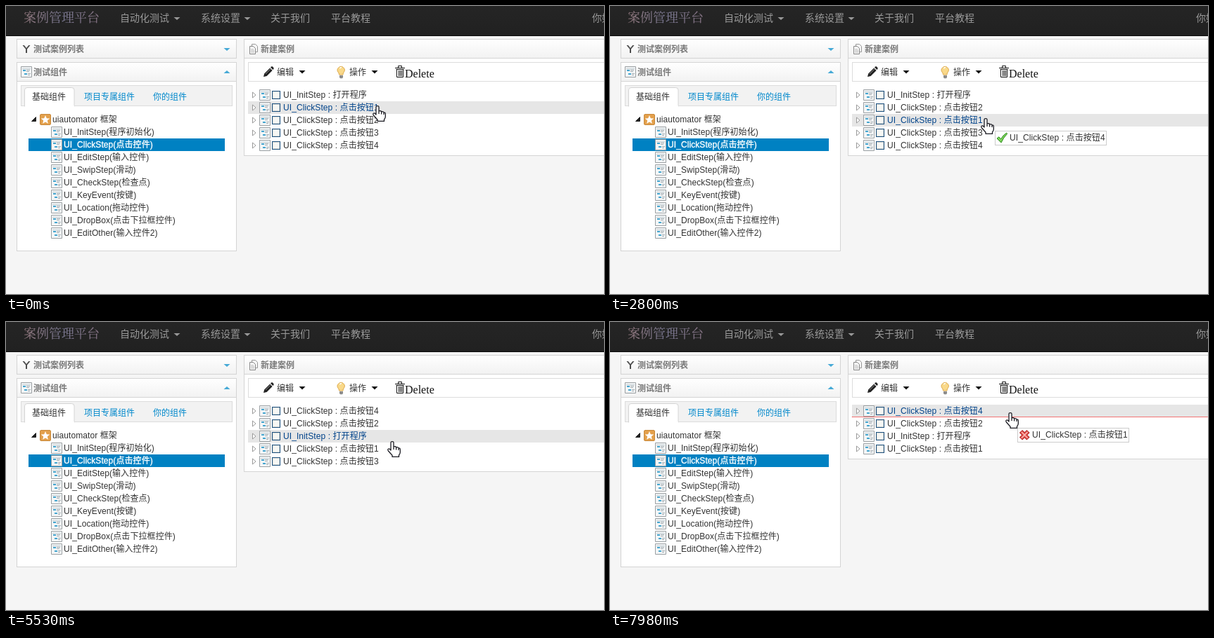
These frames come from a looping animation (850x411 px, 8 s). An HTML page:

```html
<!DOCTYPE html>
<html lang="zh-CN">
<head>
<meta charset="utf-8">
<title>案例管理平台</title>
<style>
html, body { margin: 0; width: 100%; height: 100%; overflow: hidden; background: #f5f5f5; }
svg { display: block; width: 850px; height: 411px; }
text { font: 12px "Liberation Sans", "Noto Sans CJK SC", "Noto Sans CJK", sans-serif; fill: #333; white-space: pre; }
.step { letter-spacing: .08px; }
.menu { font-size: 14px; fill: #999; }
.logo { font: 18px "Noto Serif CJK SC", "Noto Sans CJK SC", "Noto Sans CJK", serif; fill: url(#brand); }
.title { font-weight: bold; fill: #777; }
.link { fill: #0088cc; }
.del { font: 16px "Liberation Serif", serif; fill: #111; }
.on { fill: #fff; stroke: #fff; stroke-width: .35px; }
.hover { fill: #00438a; }
</style>
</head>
<body>
<svg id="stage" viewBox="0 0 850 411" xmlns="http://www.w3.org/2000/svg">
  <defs>
    <linearGradient id="head" x2="0" y2="1"><stop stop-color="#fff"/><stop offset="1" stop-color="#f2f2f2"/></linearGradient>
    <linearGradient id="bar" x2="0" y2="1"><stop stop-color="#252525"/><stop offset="1" stop-color="#212121"/></linearGradient>
    <linearGradient id="brand"><stop stop-color="#957a80"/><stop offset=".5" stop-color="#7f7d98"/><stop offset="1" stop-color="#8a7688"/></linearGradient>
    <g id="item">
      <path d="M.5 .5h15v15h-15z" fill="#f4f6f7" stroke="#9a9fa2"/>
      <path d="M2 3.5h12" stroke="#d3dade" stroke-width="2"/>
      <path d="M3 6h4M5 11h4" stroke="#45a5cf" stroke-width="2"/>
      <path d="M8 5.5h5M8 7.5h4M10 10.5h4M10 12.5h3" stroke="#a3abb0"/>
    </g>
    <g id="yes">
      <path d="M1 9L3.8 6.8l2.8 3Q9.5 4.6 14.6 1L15.6 2.4Q10.4 7.5 7 15z" fill="#7ed45c" stroke="#2b8a1c" stroke-linejoin="round"/>
    </g>
    <g id="no">
      <path d="M3 3l10.5 10.5M13.5 3L3 13.5" stroke="#a82020" stroke-width="6"/>
      <path d="M3.5 3.5l9.5 9.5M13 3.5L3.5 13" stroke="#e5504a" stroke-width="4"/>
      <path d="M4 4l8.5 8.5M12.5 4L4 12.5" stroke="#f9c0bc" stroke-width="1.4"/>
    </g>
  </defs>
  <g id="page"></g>
  <g id="list"></g>
  <g id="ghost"></g>
  <path id="hand" fill="#fff" stroke="#1b1b22" stroke-width="1.3" stroke-linejoin="round"
    d="M-2 2.4Q-2 .6 0 .6Q2 .6 2 2.4V8Q5 7 5.6 8.8Q8.3 8 9 9.8Q11.3 9.6 11.3 12V16Q11.3 18 9.5 20V22.4H0V20.3L-5.6 14Q-7 11.8-5.4 11Q-3.8 10.5-2 13ZM2 8v4M5.6 9v3.5M9 10v3"/>
</svg>
<script>
const $ = id => document.getElementById(id);
const text = (x, y, s, c = '') => `<text x="${x}" y="${y}" class="${c}">${s}</text>`;
const rect = (x, y, w, h, fill, more = '') => `<rect x="${x}" y="${y}" width="${w}" height="${h}" fill="${fill}" ${more}/>`;
const box = (x, y, w, h, fill, line = '#d4d4d4', more = '') =>
  rect(x + .5, y + .5, w - 1, h - 1, fill, `stroke="${line}" ${more}`);
const path = (d, fill, line = 'none', more = '') => `<path d="${d}" fill="${fill}" stroke="${line}" ${more}/>`;
const use = (id, x, y) => `<use href="#${id}" x="${x}" y="${y}"/>`;
const caret = (x, y, fill, dy = 4) => path(`M${x} ${y}h9l-4.5 ${dy}z`, fill);

function drawPage() {
  const tools = ['InitStep(程序初始化)', 'ClickStep(点击控件)', 'EditStep(输入控件)', 'SwipStep(滑动)',
    'CheckStep(检查点)', 'KeyEvent(按键)', 'Location(拖动控件)', 'DropBox(点击下拉框控件)', 'EditOther(输入控件2)'];
  let s = rect(0, 0, 850, 42, 'url(#bar)') + rect(0, 42, 850, 1, '#0a0a0a');
  s += text(25, 23, '案例管理平台', 'logo');
  [[162, '自动化测试'], [277, '系统设置'], [376, '关于我们'], [462, '平台教程'], [833, '你好']]
    .forEach(([x, m]) => s += text(x, 22, m, 'menu'));
  s += caret(238.5, 16, '#999') + caret(338.5, 16, '#999');

  // left panels
  s += box(15, 47, 313, 28, 'url(#head)') + box(15, 80, 313, 270, '#fff') + box(15, 80, 313, 28, 'url(#head)');
  s += path('M23.5 56l4.5 5.5v5.5h2v-5.5l4.5-5.5h-2.4l-3.1 4-3.1-4z', '#4d4d4d');
  s += text(39, 65.5, '测试案例列表', 'title') + caret(309.5, 60, '#45a9d6');
  s += use('item', 21, 86) + text(39, 98.5, '测试组件', 'title') + caret(309.5, 96, '#45a9d6', -4);
  s += box(21, 113, 301, 30, '#f2f2f2', '#dcdcdc');
  s += path('M26.5 143.5V120q0-3.5 3.5-3.5h63.5q3.5 0 3.5 3.5v23.5', '#fff', '#d4d4d4') + rect(27, 142, 70, 2, '#fff');
  s += text(37, 133.5, '基础组件') + text(111, 133.5, '项目专属组件', 'link') + text(209, 133.5, '你的组件', 'link');

  // component tree
  s += path('M42.5 158.5v6h-6z', '#222', '#222');
  s += box(48, 154, 16, 16, '#e3a04c', '#c98a3c', 'rx="1.5"');
  s += path('M56 156l1.8 4.2 4.4.3-3.4 2.9 1.1 4.4-3.9-2.4-3.9 2.4 1.1-4.4-3.4-2.9 4.4-.3z', '#fff');
  s += text(66, 166, 'uiautomator 框架', 'step') + rect(32, 189, 279, 18, '#0081c2');
  tools.forEach((n, i) => {
    const y = 172 + i * 18;
    s += use('item', 64, y) + text(82, y + 12, 'UI_' + n, i === 1 ? 'step on' : 'step');
  });
  $('page').innerHTML = s;
}

// header and toolbar of the right panel
function drawTools() {
  let s = box(338, 47, 530, 28, 'url(#head)') + box(344, 80, 530, 28, '#fff', '#dcdcdc');
  s += path('M349.5 54.5h5l3 3v8h-8z', '#f6f6f6', '#999') + path('M346.5 57.5h5l3 3v8h-8z', '#f6f6f6', '#888');
  s += path('M348 62h4M348 64h5M348 66h5', 'none', '#bbb') + text(362, 65.5, '新建案例', 'title');
  s += path('M366 101l1.2-4.5 8-8 3.4 3.4-8 8zM376 87.6l1-1q1-.8 2 0l1.3 1.4q.8 1 0 1.9l-1 1z', '#222');
  s += path('M369 97l7-7', 'none', '#888') + text(385, 98.5, '编辑') + caret(416.5, 92, '#111', 4.5);
  s += path('M473.5 98q0-2-1.3-3.5a5 5 0 1 1 8 0Q479 96 479 98z', '#f9d98a', '#dca84a');
  s += path('M474 99h5v3l-1 1.3h-3l-1-1.3z', '#8c8c8c') + path('M474.5 89q1-1.5 2.5-1.4', 'none', '#fff', 'stroke-width="1.5"');
  s += text(488, 98.5, '操作') + caret(519.5, 92, '#111', 4.5);
  s += path('M553 88.5h14M557.5 88v-2.5h5V88M554.5 90.5h11', 'none', '#111');
  s += path('M555.5 90.5v11h9v-11M558.5 92v8M560.5 92v8M562.5 92v8', 'none', '#111');
  return s + text(567, 102, 'Delete', 'del');
}

const LOOP = 8000, STEP = 70, TOP = 118, ROW = 18, LAG = 8;
const names = ['InitStep : 打开程序', 'ClickStep : 点击按钮1', 'ClickStep : 点击按钮2', 'ClickStep : 点击按钮3', 'ClickStep : 点击按钮4']
  .map(n => 'UI_' + n);
const widths = [141, 159, 159, 159, 159];
const orders = [[0, '01234'], [1960, '02134'], [3570, '40213'], [5530, '42013'], [7070, '4201']];
const drags = [[840, 1960, 1], [2660, 3570, 4], [4340, 5530, 0], [6370, 7070, 3], [7910, 8000, 1]];
// pointer path: time, x, y
const track = [
  [0, 528, 142], [770, 528, 142], [1330, 565, 175], [2030, 565, 175], [2380, 530, 198], [2590, 530, 198],
  [3010, 538, 121], [3080, 538, 121], [3150, 537, 119], [3920, 537, 119], [4200, 543, 143], [4270, 543, 143],
  [4690, 547, 170.5], [4760, 548, 174], [5040, 548, 174], [5180, 549, 170], [5880, 549, 170], [6090, 518, 192],
  [6160, 514, 197], [6300, 514, 197], [6790, 592, 101], [7140, 592, 101], [7700, 530, 180], [7840, 530, 180],
  [7910, 536, 173], [7980, 569, 129]
];

function pointer(t) {
  const i = track.findIndex(k => k[0] > t);
  if (i < 0) return track[track.length - 1].slice(1);
  if (i === 0) return track[0].slice(1);
  const [t0, x0, y0] = track[i - 1], [t1, x1, y1] = track[i];
  const p = (t - t0) / (t1 - t0);
  return [x0 + (x1 - x0) * p, y0 + (y1 - y0) * p];
}

const rowAt = y => Math.floor((y - TOP) / ROW);
const tools = drawTools();

function draw(now) {
  const t = Math.floor(now / STEP) * STEP;
  const order = orders.filter(o => o[0] <= t).pop()[1];
  const drag = drags.find(d => t >= d[0] && t < d[1]);
  const [x, y] = pointer(t), [gx, gy] = pointer(t - LAG);
  const hover = rowAt(drag ? gy : y);

  let s = box(338, 47, 530, 77 + order.length * ROW, '#fff') + tools;
  [...order].forEach((id, i) => {
    const top = TOP + i * ROW, hot = i === hover;
    if (hot) s += rect(344, top, 506, ROW, '#e6e6e6');
    s += path(`M350.5 ${top + 5}v8l4.5-4z`, '#fff', '#999') + use('item', 360, top + 1);
    s += box(378, top + 3, 12, 12, '#fff', '#1c5180') + box(379, top + 4, 10, 10, '#f7f7f4', '#dcdcd7');
    s += text(394, top + 13, names[id], hot ? 'step hover' : 'step');
    if (hot && drag && +id !== drag[2]) {
      const edge = gy - top < 5 ? top + .5 : gy - top > 13 ? top + 17.5 : 0;
      if (edge) s += path(`M344 ${edge}H850`, 'none', '#f00', 'stroke-dasharray="1 1"');
    }
  });
  $('list').innerHTML = s;

  let g = '';
  if (drag) {
    const id = drag[2], px = Math.round(gx + 13.6), py = Math.round(gy + 17);
    const over = order[rowAt(pointer(t - STEP)[1])];
    const ok = over !== undefined && +over !== id;
    g = box(px, py, widths[id], 21, '#fff', '#ccc') + use(ok ? 'yes' : 'no', px + 2, py + 2) + text(px + 21, py + 14, names[id], 'step');
  }
  $('ghost').innerHTML = g;
  $('hand').setAttribute('transform', `translate(${Math.round(x)} ${Math.round(y)})`);
}

drawPage();
const start = performance.now();
function tick() {
  draw((performance.now() - start) % LOOP);
  requestAnimationFrame(tick);
}
tick();
</script>
</body>
</html>
```
